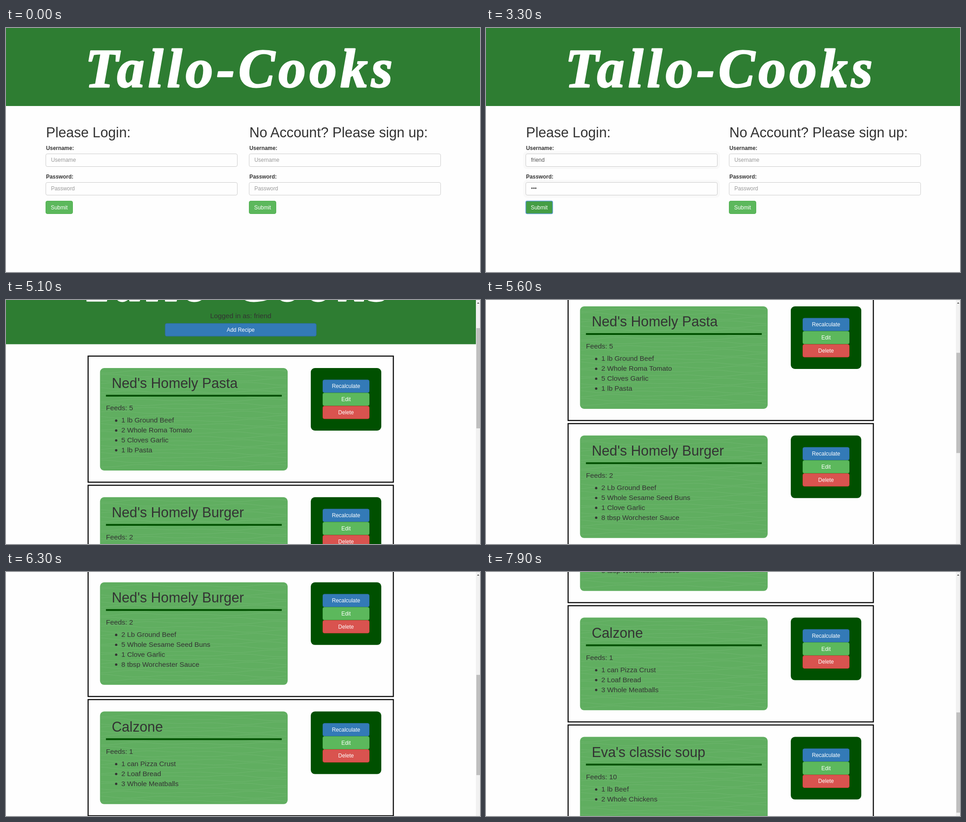
An HTML page for the animation above (8000 ms loop, 1042x538 px).

```html
<!DOCTYPE html>
<html lang="en">
<head>
<meta charset="utf-8">
<title>Recipe calculator</title>
<style>
  html, body { margin: 0; height: 100%; overflow: hidden; background: #fefefe; }
  svg { display: block; width: 1042px; height: 538px; }
  text { font-family: "Liberation Sans", Arial, sans-serif; fill: #333; }
  .title {
    font: italic bold 120px "Liberation Serif", "Times New Roman", serif;
    letter-spacing: 8px; fill: #fff; stroke: #fff; stroke-width: 3; stroke-linejoin: round;
  }
</style>
</head>
<body>
<svg id="stage" viewBox="0 0 1042 538"></svg>
<script>
const LOOP = 8000, STEP = 100;
const SMALL = 11.9, MEDIUM = 15.3, LARGE = 30.7, LINE = 21.8;
const HEADER = '#2e7d32', DARK = '#005000';
const BLUE = ['#337ab7', '#2e6da4'], GREEN = ['#5cb85c', '#4cae4c'], RED = ['#d9534f', '#d43f3a'];
const USER = 'friend';
const USER_KEYS = [800, 1000, 1100, 1400, 1500, 1600];
const PASS_KEYS = [2000, 2200, 2300];
const SCROLL = [[4600, 0], [4700, 8], [5100, 128], [5200, 128], [5600, 264],
  [6300, 540], [6800, 680], [7200, 722], [7800, 722], [7900, 747]];
const RECIPES = [
  ["Ned's Homely Pasta", 5, ['1 lb Ground Beef', '2 Whole Roma Tomato', '5 Cloves Garlic', '1 lb Pasta']],
  ["Ned's Homely Burger", 2, ['2 Lb Ground Beef', '5 Whole Sesame Seed Buns', '1 Clove Garlic', '8 tbsp Worchester Sauce']],
  ['Calzone', 1, ['1 can Pizza Crust', '2 Loaf Bread', '3 Whole Meatballs']],
  ["Eva's classic soup", 10, ['1 lb Beef', '2 Whole Chickens']],
];

const rect = (x, y, w, h, fill, extra = '') =>
  `<rect x="${x}" y="${y}" width="${w}" height="${h}" fill="${fill}" ${extra}/>`;
const text = (x, y, s, size, extra = '') =>
  `<text x="${x}" y="${y}" font-size="${size}" ${extra}>${s}</text>`;
const shift = (x, y, body) => `<g transform="translate(${x} ${y})">${body}</g>`;
const title = x => `<text class="title" x="${x}" y="130">Tallo-Cooks</text>`;

function button(x, y, w, label, [fill, border]) {
  return rect(x + .5, y + .5, w - 1, 28, fill, `rx="3.4" stroke="${border}"`) +
    text(x + w / 2, y + 18.5, label, SMALL, 'text-anchor="middle" style="fill:#fff"');
}

// focus runs from 0 to 1; a visited field keeps a pale halo
function field(y, label, value, focus = 0, visited = false) {
  return (visited ? rect(-5, y - 5, 432, 39, '#f9f9f9', 'rx="8"') : '') +
    rect(-1, y - 1, 424, 31, '#b5d7f4', `rx="4.5" opacity="${focus}"`) +
    rect(.5, y + .5, 421, 28, '#fefefe', 'rx="3.4" stroke="#ccc"') +
    rect(.5, y + .5, 421, 28, 'none', `rx="3.4" stroke="#66afe9" opacity="${focus}"`) +
    text(1, y - 8.5, label + ':', SMALL, 'font-weight="bold"') +
    text(12, y + 18.2, value || label, SMALL, `style="fill:${value ? '#555' : '#999'}"`);
}

function form(heading, user = '', pass = '', userFocus = 0, passFocus = 0, seen = [], colors = GREEN, ring = false) {
  return text(1, 241.3, heading, LARGE) +
    field(277, 'Username', user, userFocus, seen[0]) +
    field(340, 'Password', pass, passFocus, seen[1]) +
    button(0, 381, 60, 'Submit', colors) +
    (ring ? rect(.5, 381.5, 59, 28, 'none', 'rx="3" stroke="#5b9bd5" stroke-width="1.5"') : '');
}

function forms(t) {
  const typed = keys => keys.filter(k => k <= t).length;
  const userFocus = t < 600 || t >= 1800 ? 0 : t < 700 ? .5 : 1;
  const passFocus = t < 1800 || t >= 2900 ? 0 : t < 2800 ? 1 : .5;
  const pressed = t >= 2800 && t < 3300;
  const colors = t < 2600 ? GREEN : pressed ? ['#398439', '#255625'] : ['#449d44', '#398439'];
  return shift(87, 0, form('Please Login:', USER.slice(0, typed(USER_KEYS)), '•'.repeat(typed(PASS_KEYS)),
      userFocus, passFocus, [t >= 600, t >= 1800], colors, t >= 2800)) +
    shift(534, 0, form('No Account? Please sign up:'));
}

function grain(h) {
  let d = '';
  for (let y = 8; y < h - 4; y += 9)
    for (let x = 2; x <= 410; x += 8) {
      const dy = 1.8 * Math.sin(x / 23 + y * 1.7) + 1.4 * Math.sin(x / 41 + y);
      d += `${x > 2 ? 'L' : 'M'}${x} ${(y + dy).toFixed(1)}`;
    }
  return `<path d="${d}" fill="none" stroke="#fff" stroke-width=".8" opacity=".1"/>`;
}

function recipe([name, feeds, items], y) {
  const h = 138.8 + LINE * items.length;
  const list = items.map((item, i) => {
    const base = 120.4 + LINE * i;
    return `<circle cx="35.5" cy="${base - 4.5}" r="2.6" fill="#333"/>` + text(46.8, base, item, MEDIUM);
  }).join('');
  const card = rect(0, 0, 412.5, h, '#60ae60', 'rx="9"') + grain(h) +
    text(25.7, 44.4, name, LARGE) + rect(13, 59, 386.5, 4, DARK) +
    text(13, 93, 'Feeds: ' + feeds, MEDIUM) + list;
  const tools = rect(463.3, 0, 155, 138, DARK, 'rx="9"') +
    button(489.3, 25.6, 103, 'Recalculate', BLUE) +
    button(489.3, 54.5, 103, 'Edit', GREEN) +
    button(489.3, 83.4, 103, 'Delete', RED);
  return rect(180.5, y + 1.2, 671, h + 52, 'none', 'stroke="#000" stroke-width="2.3"') +
    shift(206.7, y + 27.5, card + tools);
}

function recipeList() {
  let y = 250.5, out = '';
  for (const r of RECIPES) {
    out += recipe(r, y);
    y += 197.6 + LINE * r[2].length;
  }
  return out;
}
const LIST = recipeList();

function scrollAt(t) {
  const i = SCROLL.findIndex(k => k[0] > t);
  if (i === 0) return 0;
  if (i < 0) return SCROLL[SCROLL.length - 1][1];
  const [t0, a] = SCROLL[i - 1], [t1, b] = SCROLL[i];
  return a + (b - a) * (t - t0) / (t1 - t0);
}

function recipesPage(t) {
  const loaded = t >= 3800, top = scrollAt(t);
  const header = rect(0, 0, 1042, 225.5, HEADER) + title(168.5) +
    text(516, 167.7, 'Logged in as: ' + USER, MEDIUM, 'text-anchor="middle"') +
    button(349.5, 179.3, 333, 'Add Recipe', BLUE);
  const bar = rect(1033, 0, 9, 538, '#f1f1f1') +
    rect(1034, 10.8 + .4 * top, 8, 221, '#bfbfbf') +
    '<path d="M1035.5 8l2.5-3 2.5 3z" fill="#505050"/>';
  return shift(0, -top, header + (loaded ? LIST : '')) + (loaded ? bar : '');
}

const loginPage = t => rect(0, 0, 1042, 172, HEADER) + title(174) + forms(t);

const stage = document.getElementById('stage');
const start = performance.now();
let shown = -1;
function draw() {
  const t = Math.floor((performance.now() - start) % LOOP / STEP) * STEP;
  if (t !== shown) {
    stage.innerHTML = t < 3700 ? loginPage(t) : recipesPage(t);
    shown = t;
  }
  requestAnimationFrame(draw);
}
draw();
</script>
</body>
</html>
```
